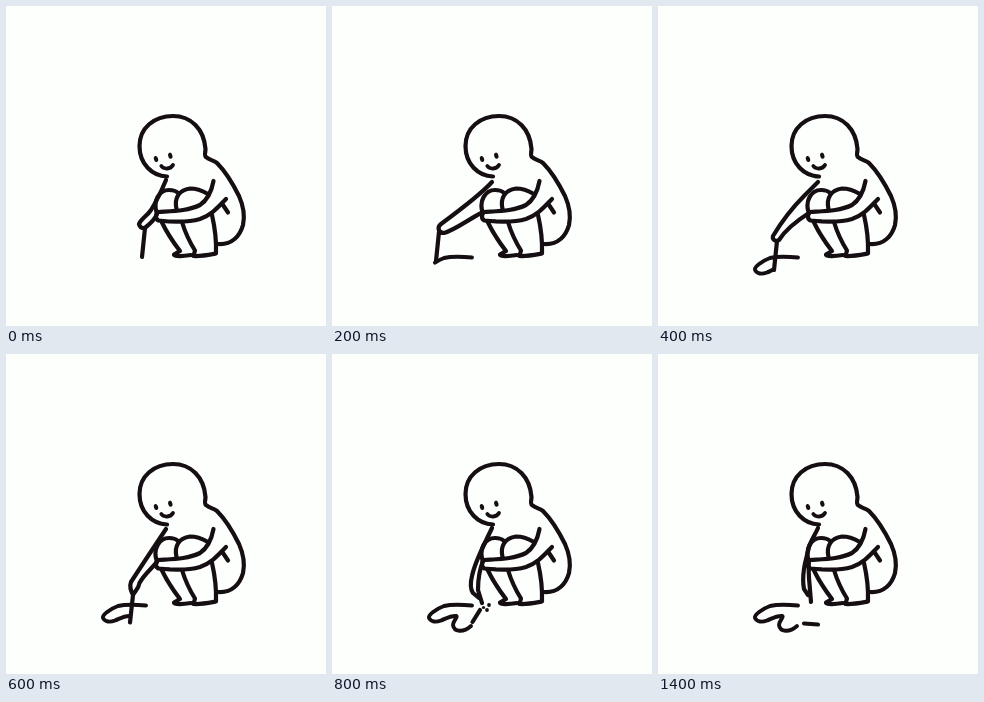
Write an HTML page without scripts that moves like this. It is 320 by 320 pixels and loops after 2.9 s.

```html
<!DOCTYPE html>
<html lang="en">
<head>
<meta charset="utf-8">
<title>Drawing in the sand</title>
<style>
  html, body { margin: 0; width: 100%; height: 100%; overflow: hidden; background: #fdfffc; }
  svg { display: block; width: 100vw; height: 100vh; }
  .ink { fill: none; stroke: #150e12; stroke-width: 4.2; stroke-linecap: round; stroke-linejoin: round; }
  .dot { fill: #150e12; stroke: none; }

  /* the line drawn by the stick */
  .trail {
    stroke-width: 3.9;
    stroke-dasharray: 114 300;
    animation: draw 2.9s step-end infinite;
  }
  @keyframes draw {
    0% { stroke-dashoffset: 120; }
    3.448% { stroke-dashoffset: 94; }
    6.897% { stroke-dashoffset: 75; }
    10.345% { stroke-dashoffset: 61; }
    13.793% { stroke-dashoffset: 44; }
    17.241% { stroke-dashoffset: 38; }
    20.69% { stroke-dashoffset: 35; }
    24.138% { stroke-dashoffset: 12; }
    27.586%, 100% { stroke-dashoffset: 0; }
  }

  /* each pose is held for one tick, the last one until the loop ends */
  .pose {
    visibility: hidden;
    animation: tick 2.9s step-end infinite;
    animation-delay: calc(var(--n) * .1s - 2.9s);
  }
  .rest { animation-name: rest; }
  @keyframes tick { 0% { visibility: visible; } 3.448%, 100% { visibility: hidden; } }
  @keyframes rest { 0% { visibility: visible; } 62.069%, 100% { visibility: hidden; } }
</style>
</head>
<body>
<svg viewBox="0 0 320 320">
  <defs>
    <path id="slack" d="M160 174C157 181 153 186 151 193C149 202 147 208 146 215C145 222 145 230 146 235L150 241M151 207C150 214 151 219 151 224L153 248"/>
  </defs>
  <g class="ink">
    <!-- head and back -->
    <path d="M161 170.500C146 170 133.500 158 133.500 140C133.500 122 148 110 167 110C185 110 198 123 199.500 143C199.500 146 198 150 200 151C203 154 207 154 211 157C219 165 227 178 233 190C237 199 239 210 237 219C234 230 226 239 212 238"/>
    <!-- face -->
    <ellipse class="dot" cx="150" cy="153" rx="2.1" ry="3.100" transform="rotate(-14 150 153)"/>
    <ellipse class="dot" cx="164.300" cy="149.700" rx="2.1" ry="3.100" transform="rotate(-14 164.300 149.700)"/>
    <path stroke-width="3.8" d="M155.300 160C158 163.700 164.500 163.300 167 159"/>
    <!-- resting arm -->
    <path d="M207.500 175C206 183 203 193 194 199C182 205 167 205 152 206C149.500 208 149 213 152.500 214.500C166 216 184 216 194 213C206 209 213 200 220 193M216 197.500L222 206.500"/>
    <!-- knees -->
    <path d="M150.500 206C147 195 153 184 163 184C167 184 170 185 172 187M170.500 203C168 192 173 184 184 182.500C190 182.500 196 184.500 201 187.500"/>
    <!-- legs and feet -->
    <path d="M155.500 215.500C160 225 167 236 174 245L168 248.500C168 251 178 250 185 249M176 216C179 226 183 235 189 244.500L187.500 250C195 250.500 202 249 210 247.500C210.500 234 209 222 206 209"/>

    <path class="trail" pathLength="112" d="M140 251.500C130 250.500 120 250 112 252C104 255 96 261 97 264C99 268 104 268.500 109 266.500C113 265 118 261.500 124.500 262C126 263 121 267 121 271C122 278 131 279 139 272"/>

    <g class="pose" style="--n:0">
      <path d="M160 174C155 186 150 196 145 204C141 210 135 213 133 218C134 222 137 223 140 221C145 217 149 213 151 208M139 222L136 251"/>
    </g>
    <g class="pose" style="--n:1">
      <path d="M160 175C152 188 136 205 121 216C118 219 120 224 125 223C135 219 144 212 151 207M123 224L120 252"/>
    </g>
    <g class="pose" style="--n:2">
      <path d="M160 176C149 188 128 204 109 218C105 221 106 227 112 227C123 224 137 213 151 206M107 226L104 255"/>
    </g>
    <g class="pose" style="--n:3">
      <path d="M160 176C148 190 126 208 109 225C106 229 109 233 114 231C126 227 138 214 151 207M110 232L103 266"/>
    </g>
    <g class="pose" style="--n:4">
      <path d="M160 176L146 190C136 200 124 215 115 230C114 234 118 236 121 234C128 223 140 214 151 207M119 235L116 264"/>
    </g>
    <g class="pose" style="--n:5">
      <path d="M160 176C147 190 134 212 121 229C118 234 123 238 126 235C132 225 143 216 151 208M123 236L121 263"/>
    </g>
    <g class="pose" style="--n:6">
      <path d="M160 175C150 190 136 211 125 228C123 233 125 237 127 241M151 208C144 216 137 222 133.500 229C132.500 235 129 237 127 241L124 268.500"/>
    </g>
    <g class="pose" style="--n:7">
      <path d="M160 175C151 192 141 210 134 229C132 235 133 240 135 244M152 208C147 217 141 229 139 238L135 244L130 276"/>
    </g>
    <g class="pose" style="--n:8">
      <path d="M160 174C152 191 143 207 140 222C138 230 139 236 141 239L147 244M151 207C147 217 146 227 146 236L150 249M140.500 268L148 256"/>
      <circle class="dot" cx="151.500" cy="253.500" r="1.6"/>
      <circle class="dot" cx="157" cy="251" r="1.9"/>
      <circle class="dot" cx="155" cy="256" r="1.9"/>
    </g>
    <g class="pose" style="--n:9">
      <use href="#slack"/>
      <path d="M143 269L156 261"/>
    </g>
    <g class="pose" style="--n:10">
      <use href="#slack"/>
      <path d="M145 270L160 267"/>
    </g>
    <g class="pose rest" style="--n:11">
      <use href="#slack"/>
      <path d="M146 269.500L160 270.500"/>
    </g>
  </g>
</svg>
</body>
</html>
```
